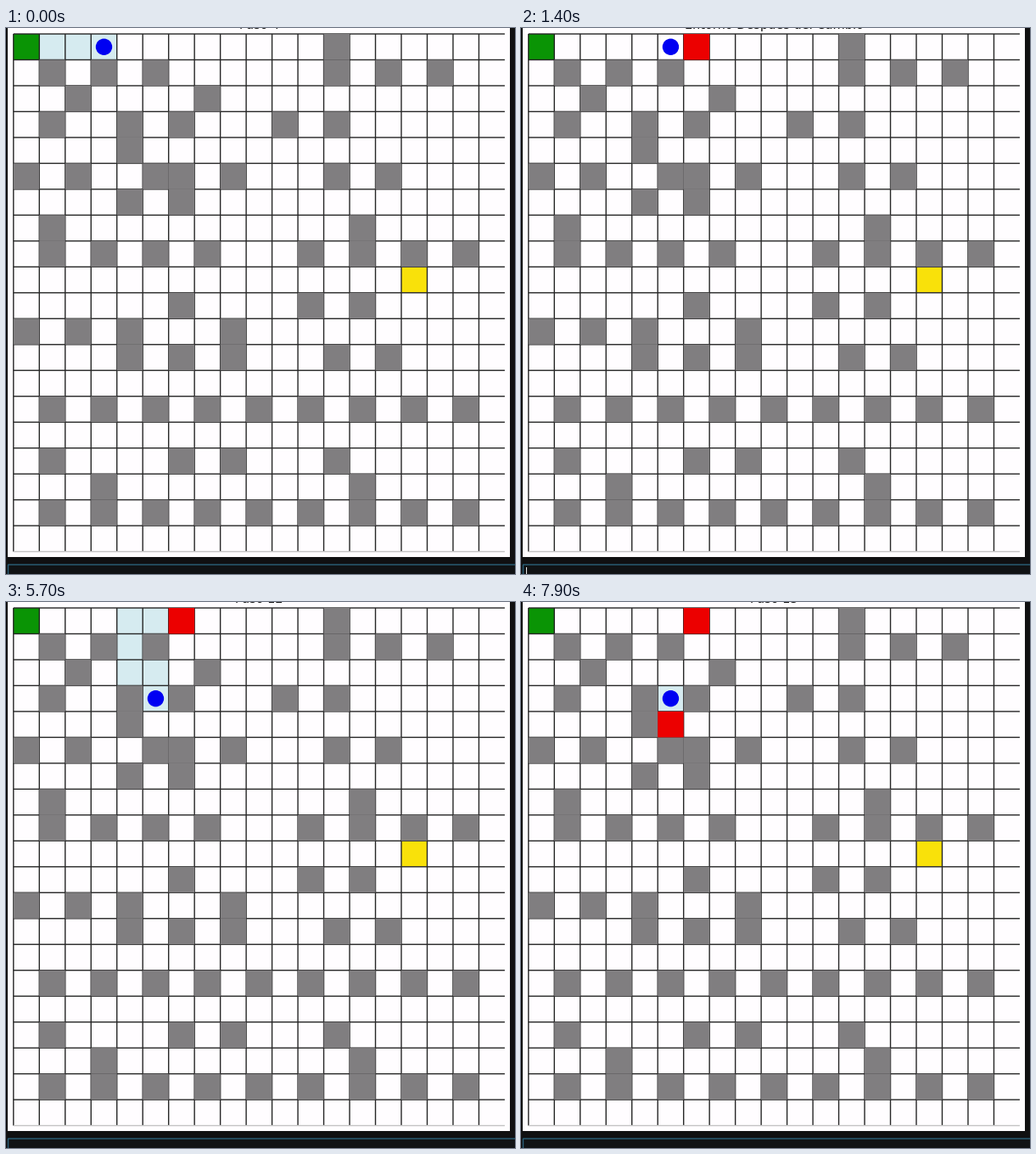
Write a matplotlib script that moves like this. It is 600 by 643 pixels and loops after 8000 ms.

```python
from itertools import product

import matplotlib.pyplot as plt
from matplotlib.animation import FuncAnimation
from matplotlib.patches import Circle, Rectangle

W, H, DPI = 600, 643, 100
FRAMES, TICK = 80, 100
COLS, ROWS = 19, 20
X0, Y0, PITCH = 8.8, 7, 30.48
STEP_MS, NOTE_MS, PAUSE_MS, FIRST_MS = 432, 100, 2000, -1302
SCROLL = 10.5
DARK, LINE = "#101011", "#262626"
PT = 72 / DPI

START, GOAL = (0, 0), (9, 15)
MOVES = {"R": (0, 1), "L": (0, -1), "D": (1, 0)}
WALKS = ["RRRRR", "LDDRD", ""]


def every(first, last, step=2):
    return [*range(first, last + 1, step)]


def make_walls():
    """Walls sit on lattices of every second column, plus a few singles."""
    lattices = [
        (every(14, 18, 4), every(1, 17)),
        ([8], every(1, 7) + every(11, 17)),
        ([1], every(1, 5) + every(12, 16)),
        (every(5, 11, 6), every(0, 2)),
        (every(5, 12, 7), every(6, 8) + every(12, 14)),
        ([3, 6, 12], every(4, 6)),
        ([3, 7, 16], [1]),
        ([0, 3, 16], [12]),
        ([7, 17], [13]),
        ([10, 16], [6]),
        ([11, 16], [8]),
        ([4, 11], [4]),
        ([10], every(11, 13)),
        ([2], [2, 7]),
    ]
    walls = {cell for rows, cols in lattices for cell in product(rows, cols)}
    return walls | {(3, 10), (5, 5), (17, 3)}


def move(cell, key):
    return cell[0] + MOVES[key][0], cell[1] + MOVES[key][1]


def make_legs():
    """Each walk ends at an obstacle one cell ahead, then a new one begins."""
    legs, cell, begin, number = [], START, FIRST_MS, 1
    for keys in WALKS:
        route = [cell]
        for key in keys:
            route.append(move(route[-1], key))
        cell = route[-1]
        block = move(cell, keys[-1]) if keys else None
        legs.append((begin, number, route, block))
        begin += len(route) * STEP_MS + PAUSE_MS
        number += len(route)
    return legs


LEGS = make_legs()


def state(ms):
    """Title, dot cell, trail, visible obstacles and console message."""
    done = [leg for leg in LEGS if leg[0] <= ms]
    begin, number, route, block = done[-1]
    blocks = [leg[3] for leg in done[:-1]]
    over = ms - begin - len(route) * STEP_MS
    if block and over >= NOTE_MS:
        return "Entorno Después del Cambio", route[-1], [], blocks + [block], ""
    i = min((ms - begin) // STEP_MS, len(route) - 1)
    note = ""
    if block and over >= 0:
        note = f"Obstáculo añadido en la posición {block} en el paso {number + i}"
    return f"Paso {number + i}", route[i], route[:i + 1], blocks, note


def corner(cell):
    return X0 + cell[1] * PITCH, Y0 + cell[0] * PITCH


def center(cell):
    x, y = corner(cell)
    return x + PITCH / 2, y + PITCH / 2


fig = plt.figure(figsize=(W / DPI, H / DPI), dpi=DPI, facecolor=DARK)


def layer():
    ax = fig.add_axes([0, 0, 1, 1])
    ax.set(xlim=(0, W), ylim=(H, 0))
    ax.axis("off")
    return ax


board, console = layer(), layer()


def add_cell(cell, color, z):
    return board.add_patch(Rectangle(corner(cell), PITCH, PITCH, fc=color,
                                     lw=0, zorder=z, snap=False))


# board
board.add_patch(Rectangle((2, -10), 592, 633, fc="#fffdff", lw=0, zorder=0))
right, bottom = X0 + COLS * PITCH, Y0 + ROWS * PITCH
grid = dict(lw=1.4 * PT, zorder=2, snap=False)
board.vlines([X0 + i * PITCH for i in range(COLS)], Y0, bottom, colors=LINE, **grid)
board.hlines([Y0 + i * PITCH for i in range(ROWS)], X0, right, colors=LINE, **grid)
board.hlines(bottom, X0, right, colors="#c4c4c4", **grid)
for cell in make_walls():
    add_cell(cell, "#807e80", 3)
add_cell(START, "#0a9405", 1.5)
add_cell(GOAL, "#f9e10a", 1.5)
trail_cells = [add_cell(START, "#d6ebf0", 1) for _ in range(6)]
red_cells = [add_cell(leg[3], "#ec0000", 3) for leg in LEGS if leg[3]]
dot = board.add_patch(Circle((0, 0), 9.7, fc="#0000f2", lw=0, zorder=4))
title = board.text(298.7, 1, "", family="DejaVu Sans", size=14.5 * PT,
                   ha="center", va="baseline", color="#151515", zorder=4)

# console
console.add_patch(Rectangle((2.5, 632), W, 30, fc="#101214", ec="#2a6079",
                            lw=1.4 * PT, snap=False))
note_text = console.text(6, 622.5, "", family="DejaVu Sans Mono", weight="bold",
                         size=7.27 * PT, va="baseline", color="white")
cursor = console.add_patch(Rectangle((6, 635), 1, 8, fc="#e8e8e8", lw=0))


def draw(frame):
    ms = frame * TICK
    name, pos, trail, blocks, note = state(ms)
    title.set_text(name)
    dot.center = center(pos)
    for i, patch in enumerate(trail_cells):
        patch.set_visible(i < len(trail))
        if i < len(trail):
            patch.set_xy(corner(trail[i]))
    for i, patch in enumerate(red_cells):
        patch.set_visible(i < len(blocks))
    shift = SCROLL if note else 0
    board.set_ylim(H + shift, shift)
    note_text.set_text(note)
    cursor.set_visible((ms - 100) // 600 % 2 == 0)
    return []


anim = FuncAnimation(fig, draw, frames=FRAMES, interval=TICK,
                     init_func=lambda: draw(0), repeat=True, repeat_delay=0,
                     blit=False)
plt.show()
```
